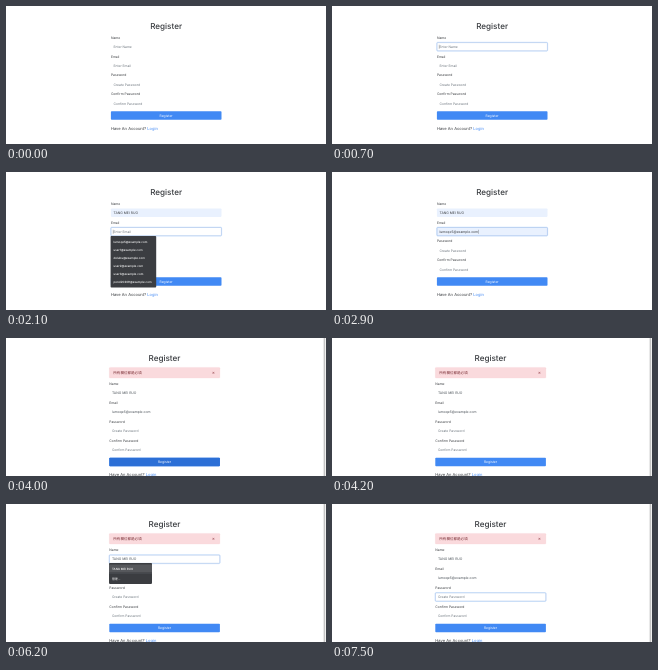
These frames come from a looping animation (320x138 px, 8000 ms). An HTML page:

```html
<!DOCTYPE html>
<html lang="zh-Hant">
<head>
<meta charset="utf-8">
<title>Register</title>
<style>
  html, body { margin: 0; width: 100%; height: 100%; overflow: hidden; background: #fff; }
  svg { display: block; width: 100%; height: 100%; }
  text { font-family: Inter, "Noto Sans CJK TC", "Noto Sans CJK", sans-serif; text-rendering: geometricPrecision; white-space: pre; }
</style>
</head>
<body>
<svg id="stage" viewBox="0 0 320 138"></svg>
<script>
const LOOP = 8000, SUBMIT = 4000;
const NAME = 'TANG MEI RUO', EMAIL = 'lumoqe5@example.com';
const BLUE = '#4189f4', INK = '#383b3f', GREY = '#6c757d';
const LABELS = ['Name', 'Email', 'Password', 'Confirm Password'];
const HINTS = ['Enter Name', 'Enter Email', 'Create Password', 'Confirm Password'];
const EMAILS = [EMAIL, 'user1@example.com', 'dolubu@example.com', 'user2@example.com', 'user3@example.com', 'pond20209@example.com'];
const ROW = 18.9, WIDTH = 110.6;

const stage = document.getElementById('stage');

const rect = (x, y, w, h, fill, more = '') =>
  `<rect x="${x}" y="${y}" width="${w}" height="${h}" fill="${fill}" ${more}/>`;
const text = (x, y, size, fill, s, more = '') =>
  `<text x="${x}" y="${y}" font-size="${size}" fill="${fill}" ${more}>${s}</text>`;

function draw(t) {
  const within = (a, b) => t >= a && t < b;
  // two-step transition, half way at its start
  const ramp = a => t < a ? 0 : t < a + 100 ? .5 : 1;
  const late = t >= SUBMIT;
  const x = late ? 103.3 : 104.9, dy = late ? 14.5 : 0;

  const focus = late
    ? [ramp(5600) - ramp(6500), 0, ramp(7000), 0]
    : [ramp(600) - ramp(2000), ramp(2000), 0, 0];
  const filled = late ? [0, 0, 0, 0] : [ramp(1100), ramp(2500), 0, 0];
  const values = [t >= 1100 && NAME, t >= 2500 && EMAIL];
  const preview = [within(1100, 1600), within(2500, 2900)];
  const caret = [
    within(600, 1100) || within(1600, 2000) || within(5600, 6100),
    within(2000, 2500) || within(2900, 3500),
    within(7000, 7500)
  ];

  function field(i) {
    const y = 36.5 + ROW * i + dy, f = focus[i], base = y + 5.4;
    let s = text(x, y - 3.9, 3.35, INK, LABELS[i]);
    s += rect(x, y, WIDTH, 8.4, '#e9f1fe', `rx=".8" fill-opacity="${filled[i]}"`);
    if (f) {
      s += rect(x - .2, y - .3, WIDTH + .4, 9, 'none', `rx="1" stroke="#007bff" stroke-width=".7" stroke-opacity="${.18 * f}"`);
      s += rect(x + .1, y + .1, WIDTH - .2, 8.2, 'none', `rx=".8" stroke="#8fb0e2" stroke-width=".45" stroke-opacity="${f}"`);
    }
    const value = values[i], size = preview[i] ? 3.05 : 3.4;
    const bar = caret[i] ? '<tspan fill="#111">|</tspan>' : '';
    if (value) s += text(x + 2.6, base, size, late ? '#495057' : INK, value + bar);
    else {
      s += text(x + 2.6, base, 3.3, GREY, HINTS[i]);
      if (bar) s += text(x + 1.6, base, 3.4, INK, bar);
    }
    return s;
  }

  // autofill list; the last entry may sit below a divider
  function menu(y, w, items, active, divided) {
    const h = items.length * 8.1 + (divided ? 4.6 : 3);
    let s = rect(x - .3, y, w, h, '#3b3d41', 'rx=".8"');
    items.forEach((item, i) => {
      const last = divided && i === items.length - 1;
      const top = y + 1.4 + i * 8.1 + (last ? 1.8 : 0);
      if (last) s += rect(x - .3, top - 1, w, .3, '#5f6368');
      if (i === active) s += rect(x - .3, top, w, 8, '#56585c');
      s += text(x + 2.6, top + 5.1, 2.95, '#fff', item, 'font-weight="500"');
    });
    return s;
  }

  let s = text(x + 55.2, 23.4, 8.1, INK, 'Register', 'font-weight="500" text-anchor="middle"');

  if (late) {
    s += rect(x, 29.4, WIDTH, 10.6, '#fadadd', 'rx=".8" stroke="#f5ccd1" stroke-width=".25"');
    s += text(x + 4, 36.2, 3.55, '#7d3239', '所有欄位都是必填');
    s += text(x + 104, 36.1, 4.2, '#a9626a', '×', 'font-weight="700" text-anchor="middle"');
  }

  for (let i = 0; i < 4; i++) s += field(i);

  const hover = late ? 1 - ramp(4100) : ramp(3700);
  s += rect(x, 105.3 + dy, WIDTH, 8.4, BLUE, 'rx=".8"');
  s += rect(x, 105.3 + dy, WIDTH, 8.4, '#2c6fd6', `rx=".8" fill-opacity="${hover}"`);
  s += text(x + 55.2, 110.7 + dy, 3.4, '#fff', 'Register', 'text-anchor="middle"');
  s += text(x, 123.6 + dy, 4.05, INK, `Have An Account? <tspan fill="${BLUE}">Login</tspan>`);

  if (within(900, 1600)) s += menu(44.6, 43, [NAME, '測試用', '管理…'], t >= 1100 ? 0 : -1, true);
  if (within(2100, 2900)) s += menu(64, 45.6, EMAILS, t >= 2500 ? 0 : -1, false);
  if (within(5700, 6500)) s += menu(59.1, 43, [NAME, '管理…'], t >= 6200 ? 0 : within(5900, 6100) ? 1 : -1, true);

  if (late) {
    s += rect(316.8, 0, 3.2, 138, '#fafafa');
    s += rect(317.7, 0, 1.5, 138, '#c4c4c4');
  }
  stage.innerHTML = s;
}

let shown = -1;
function tick() {
  const t = Math.floor(performance.now() % LOOP / 100) * 100;
  if (t !== shown) draw(shown = t);
  requestAnimationFrame(tick);
}
tick();
</script>
</body>
</html>
```
